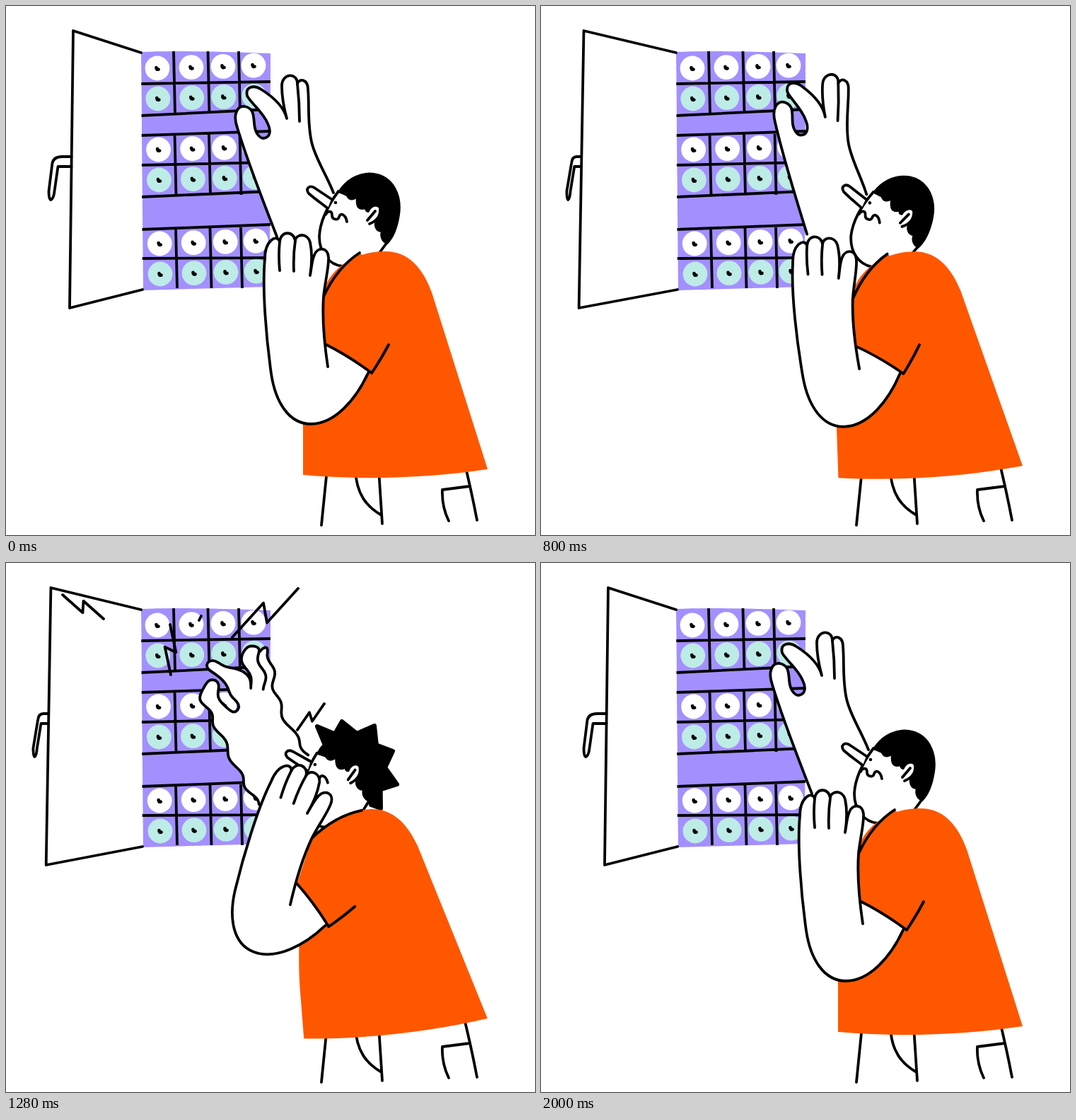
Animation of 748x748 px, one loop 2.08 s. Source, as an HTML page:

```html
<!DOCTYPE html>
<html lang="en">
<head>
<meta charset="utf-8">
<title>Fuse box</title>
<style>
  html, body { margin: 0; width: 100%; height: 100%; overflow: hidden; background: #fff; }
  svg { display: block; width: 100vw; height: 100vh; }
  .line { fill: none; stroke: #000; stroke-width: 3.8; stroke-linecap: round; stroke-linejoin: round; }
  .skin { fill: #fff; }
  .shirt { fill: #ff5700; }
  .hair { stroke: #000; stroke-width: 2; stroke-linejoin: round; }
  #spikes { stroke-width: 6; }
  #grid { stroke-linecap: butt; }
  #dots { stroke-width: 4.6; }
</style>
</head>
<body>
<svg viewBox="0 0 748 748">
  <path fill="#a48fff" d="M191 65Q240 62 374 67L373 397L194 402Z"/>
  <g id="lamps"></g>
  <path id="grid" class="line"/>
  <path id="dots" class="line"/>
  <path id="door" class="line skin"/>
  <path id="handle" class="line"/>
  <path id="sparks" class="line"/>
  <path class="line" d="M455 645L446 734M494 655C495 690 510 708 531 720M527 655L532 732M646 636Q658 685 666 727M656 679L617 684Q616 708 626 728"/>
  <g id="body">
    <g id="arm">
      <path id="armFill" class="skin"/>
      <path id="armLine" class="line"/>
      <path id="crease" class="line"/>
    </g>
    <g id="head">
      <path class="skin" d="M470 262C456 281 444 303 443 326C443 349 457 366 476 368L528 350L539 334L530 262Z"/>
      <path class="line" d="M470 262C456 281 444 303 443 326C443 349 457 366 476 368L484 366M539 334L528 349"/>
      <path class="line skin" d="M455 286C446 279 437 273 428 265C423 258 429 253 436 257L460 273"/>
      <circle cx="466" cy="278" r="2.3"/>
      <path class="line" d="M452 295C455 289 461 289 461 296C461 302 470 304 471 298C473 292 480 294 482 305"/>
      <path class="hair" d="M470 263C484 241 505 235 520 237C548 241 560 268 556 295C553 315 547 328 539 336C531 333 529 325 531 319C523 319 520 310 523 303L513 289Q509 293 508 286Q494 291 496 271Q486 277 482 268Q476 265 470 263Z"/>
      <path id="spikes" class="hair" transform="rotate(4.5 541 652)"/>
      <path class="line skin" d="M512 290C516 281 527 279 529 286C530 296 524 304 514 308"/>
      <path class="line" d="M511 303L522 290"/>
    </g>
    <path class="shirt" d="M681 655L602 405C590 372 570 347 537 347C500 346 462 366 450 400C436 450 420 520 420 595L420 663C510 671 600 667 681 655Z"/>
    <g id="front">
      <path class="shirt" d="M500 349C480 362 462 383 449 411L453 479L517 519L541 479L537 380Z"/>
      <path class="line" d="M500 349C480 362 462 383 449 411"/>
      <path id="forearmFill" class="skin"/>
      <path id="forearmLine" class="line"/>
      <path class="line" d="M409 332Q406 352 407 375M387 333Q385 353 387 374M453 479Q485 495 517 519Q530 500 541 479"/>
    </g>
  </g>
</svg>
<script>
const STEP = 80, STEPS = 26;
const $ = id => document.getElementById(id);
const setPath = (id, d) => $(id).setAttribute("d", d);
const mix = (a, b, u) => a + (b - a) * u;
const mixPoint = (p, q, u) => p.map((v, i) => mix(v, q[i], u));
const poly = pts => "M" + pts.map(p => p.join(" ")).join("L");

// Cabinet
const shelves = [110, 155, 183, 225, 270, 316, 357], rise = [3, 9, 6, 4, 8, 7, 1];
let grid = shelves.map((y, i) => `M191 ${y}L374 ${y - rise[i]}`).join("");
[[64, 152], [181, 267], [313, 399]].forEach(([top, bottom], g) => {
  for (const x of [237, 285.5, 329]) grid += `M${x + 1.5 * g} ${top}l2 ${bottom - top}`;
});
setPath("grid", grid);

let dots = "";
[88, 131, 203, 246, 336, 379].forEach((rowY, r) => {
  [214, 262, 307, 350].forEach((colX, c) => {
    const x = colX + 0.8 * r, y = rowY - 1.3 * c;
    $("lamps").innerHTML += `<circle cx="${x}" cy="${y}" r="17.4" fill="${r % 2 ? "#bdebe6" : "#fff"}"/>`;
    dots += `M${x - 1.5} ${y - 1}q0 3.5 3 2.5`;
  });
});
setPath("dots", dots);

// Reaching arm, calm and shaking
const calm = {
  arm: "M383 326C365 280 340 215 327 172C320 152 328 141 337 142C349 144 350 152 351 166C352 180 359 187 364 187C374 186 375 176 370 166C363 149 345 136 341 127C338 114 350 111 361 118C380 130 393 143 397 159C394 148 390 130 390 113C390 95 412 93 412 110C415 101 427 104 427 118C429 140 426 165 432 192C437 215 452 236 463 264",
  crease: "M412 110C414 128 415 145 415 163"
};
function shake(d) {
  const path = $("armLine"), pts = [];
  path.setAttribute("d", d);
  for (let s = 0, end = path.getTotalLength(); s <= end; s += 4) {
    const { x, y } = path.getPointAtLength(s);
    pts.push([x + 3.5 * Math.sin(y / 7), y + 2.5 * Math.sin(x / 7)]);
  }
  return poly(pts);
}
const shaken = { arm: shake(calm.arm), crease: shake(calm.crease) };

// Raised forearm
const forearm = "M455 510C449 470 447 440 449 411C451 390 457 368 456 355C455 341 441 340 436 352C432 361 432 371 430 381C433 362 433 348 430 334C426 320 410 322 409 332C407 318 389 317 387 333C383 322 366 331 366 358C362 400 368 470 375 520C381 560 400 591 431 591C465 591 495 556 512 519";
setPath("forearmLine", forearm);
setPath("forearmFill", forearm + "L517 519L453 479Z");

// Hair spikes: valleys lie between tips, pulled towards the head
const tips = [[440, 231], [475, 224], [521, 230], [547, 266], [553, 313], [530, 347]];
const skull = [490, 288];
const crown = tips.flatMap((tip, i) =>
  i ? [mixPoint(skull, mixPoint(tips[i - 1], tip, 0.5), 0.77), tip] : [tip]);
setPath("spikes", poly([[452, 260], ...crown, [516, 342], [512, 300], [480, 262]]) + "Z");

// Sparks fly from the fingertips, grow to a long bolt, then shrink to a short one
const source = [245, 185];
const bolts = [
  { long: [[138, 79], [80, 45]], short: [[34, 21], [22, 14]], side: 1 },
  { long: [[233, 158], [232, 87]], short: [[212, 46], [210, 21]], side: -1 },
  { long: [[320, 105], [413, 36]], short: [[454, 23], [487, 8]], side: -1 },
  { long: [[412, 236], [450, 199]], short: [[510, 212], [519, 212]], side: -1 },
  { long: [[273, 81], [276, 75]], short: [[285, 40], [285, 40]], side: 0 }
];

function tween(times, values, k, blend) {
  if (k <= times[0]) return values[0];
  const i = times.findIndex(t => t >= k);
  if (i < 0) return values[values.length - 1];
  return blend(values[i - 1], values[i], (k - times[i - 1]) / (times[i] - times[i - 1]));
}
const ease = (a, b, u) => mix(a, b, (1 - Math.cos(Math.PI * u)) / 2);

function bolt({ long, short, side }, k) {
  const tail = tween([12, 16, 19, 22], [source, long[0], short[0], short[1]], k, mixPoint);
  const head = tween([11.3, 16, 19], [source, long[1], short[1]], k, mixPoint);
  const dx = head[0] - tail[0], dy = head[1] - tail[1];
  if (Math.hypot(dx, dy) < 1) return "";
  const [mx, my] = mixPoint(tail, head, 0.5);
  const bend = 0.11 * side * Math.min(1, (k - 12) / 4), along = 0.5 * Math.abs(bend);
  const zx = along * dx - bend * dy, zy = along * dy + bend * dx;
  return poly([tail, [mx + zx, my + zy], [mx - zx, my - zy], head]);
}

// Eased poses: [times, values]
const pose = {
  door: [[0, 12, 13, 25], [0, 1, 1, 0]],
  lean: [[0, 8.2, 12, 13, 19], [0, 4, -9, -9, 0]],
  head: [[0, 8, 10, 12], [0, 1, 6.3, 0]],
  arm: [[0, 8, 10, 12, 16, 19], [0, 1.5, 6, -3, -3, 0]],
  raise: [[13, 16, 17, 25], [0, 26, 26, 0]]
};

function turn(id, angle, x, y) {
  $(id).setAttribute("transform", `rotate(${angle} ${x} ${y})`);
}

function drawDoor(p) {
  const top = 95 - 37 * p, bottom = 90 - 39 * p;
  setPath("door", `M191 66L${top} 35L${bottom} 427L193 401`);
  const edge = (top + bottom) / 2;
  const up = n => edge - n * (1 - 0.52 * p), low = n => edge - n * (1 - 0.38 * p);
  setPath("handle",
    `M${edge} 213L${up(13)} 213Q${up(25)} 213 ${up(27)} 222L${low(32)} 262Q${low(32)} 274 ${low(29)} 274Q${low(25)} 272 ${low(24)} 262L${up(19)} 227L${edge} 227`);
}

function draw(k) {
  const get = name => tween(...pose[name], k, ease);
  drawDoor(get("door"));
  turn("body", get("lean"), 541, 652);
  turn("head", get("head"), 490, 384);
  turn("arm", get("arm"), 470, 365);
  turn("front", get("raise"), 516, 406);
  const shocked = k >= 13 && k <= 17;
  const { arm, crease } = shocked ? shaken : calm;
  setPath("armLine", arm);
  setPath("armFill", arm + "L480 340Z");
  setPath("crease", crease);
  $("spikes").style.display = shocked ? "" : "none";
  setPath("sparks", bolts.map(b => bolt(b, k)).join(""));
}

const start = performance.now();
function tick() {
  draw(Math.floor((performance.now() - start) / STEP) % STEPS);
  requestAnimationFrame(tick);
}
tick();
</script>
</body>
</html>
```
